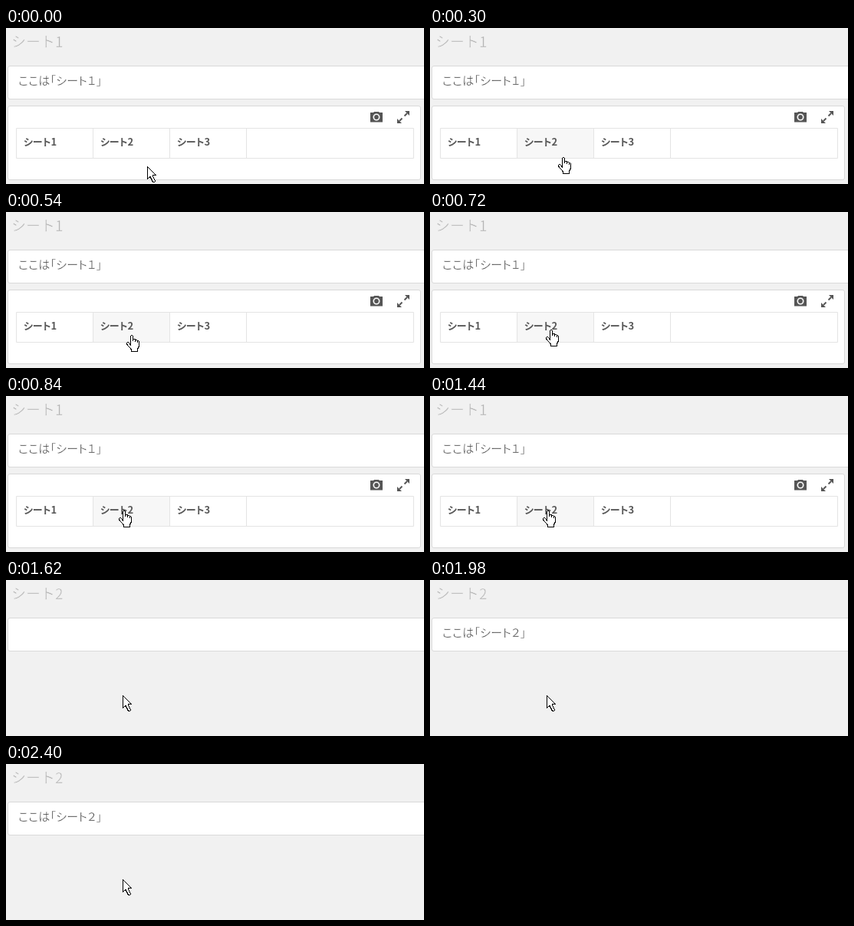
An HTML page that plays this animation: 545 by 203 pixels, repeating every 2.46 s.

```html
<!DOCTYPE html>
<html lang="ja">
<meta charset="utf-8">
<title>Sheet navigation</title>
<style>
  html, body { margin: 0; width: 100%; height: 100%; overflow: hidden; background: #f1f1f1; }
  svg { display: block; width: 545px; height: 203px; }
  text { font-family: "Noto Sans CJK JP", "Noto Sans CJK", sans-serif; fill: #595959; }
  /* A background-coloured outline thins the strokes to a light weight. */
  #title { font-size: 19px; fill: #b0b0b0; stroke: #f1f1f1; stroke-width: .6px; }
  #note { font-size: 15px; letter-spacing: .2px; font-feature-settings: "palt"; fill: #404040; stroke: #fff; stroke-width: .4px; }
  .tab { font-size: 13px; font-weight: 700; font-feature-settings: "palt"; }
  .panel { fill: #fff; stroke: #d9d9d9; }
  .grid { fill: none; stroke: #e4e4e4; }
  .icon { fill: #555; }
  .cursor { fill: #fff; stroke: #000; shape-rendering: crispEdges; }
</style>
<svg viewBox="0 0 545 203">
  <text id="title" x="7" y="25"></text>
  <rect class="panel" x="2.5" y="49.5" width="560" height="43" rx="2.5"/>
  <text id="note" x="16" y="74"></text>

  <g id="nav">
    <rect class="panel" x="2.5" y="101.5" width="538" height="96" rx="2.5"/>
    <rect id="hover" x="114" y="131" width="99" height="38" fill="#f7f7f7"/>
    <path class="grid" d="M13.5 130.5H531.5V169.5H13.5ZM113.5 130V170M213.5 130V170M313.5 130V170"/>
    <text class="tab" x="23" y="153">シート1</text>
    <text class="tab" x="123" y="153">シート2</text>
    <text class="tab" x="223" y="153">シート3</text>
    <path class="icon" d="M475 110H479L480 109H486L487 110H491V122.5H475Z"/>
    <circle cx="483" cy="116" r="3.7" fill="#555" stroke="#fff" stroke-width="1.6"/>
    <path class="icon" d="M520 108H526V114ZM510 118V124H516Z"/>
    <path d="M519.5 114.5L523 111M513 121L516.5 117.5" stroke="#555" stroke-width="1.8"/>
  </g>

  <path id="arrow" class="cursor" d="M.5 .5V16.5L4 13.5L7.5 20.5H9.5L10.5 19.5L7.5 12.5V11.5H11.5Z"/>
  <path id="hand" class="cursor" d="M.5 12V.5Q2-1.2 3.5 .5V6.5V5Q5 3.5 6.5 5V7.5V5.5Q8 4.5 9.5 6.5V8.5V7Q11 6 11.5 8V13.5L9.5 17.5V20.5H1.5V18L-4 11.5Q-5.2 9.5-4 8.8Q-2.5 8.3-1 10Z"/>
</svg>
<script>
  const LOOP = 2460, STEP = 60, SWITCH = 1560, NOTE = 1740;
  const el = id => document.getElementById(id);
  const show = (id, on) => el(id).style.display = on ? '' : 'none';
  const path = [[0, 184, 180], [540, 162, 161], [840, 152, 150], [LOOP, 152, 150]];

  function pointerAt(t) {
    const i = path.findIndex(p => p[0] > t);
    const [t0, x0, y0] = path[i - 1], [t1, x1, y1] = path[i];
    const k = (t - t0) / (t1 - t0);
    return [Math.round(x0 + (x1 - x0) * k), Math.round(y0 + (y1 - y0) * k)];
  }

  function draw(now) {
    const t = Math.floor(now % LOOP / STEP) * STEP;
    const [x, y] = pointerAt(t);
    const first = t < SWITCH, hover = first && y < 170;
    el('title').textContent = first ? 'シート1' : 'シート2';
    el('note').textContent = first ? 'ここは「シート１」' : t < NOTE ? '' : 'ここは「シート２」';
    show('nav', first);
    show('hover', hover);
    show('hand', hover);
    show('arrow', !hover);
    for (const id of ['arrow', 'hand']) el(id).setAttribute('transform', `translate(${x} ${y})`);
  }

  const start = performance.now();
  function loop() {
    draw(performance.now() - start);
    requestAnimationFrame(loop);
  }
  loop();
</script>
</html>
```
